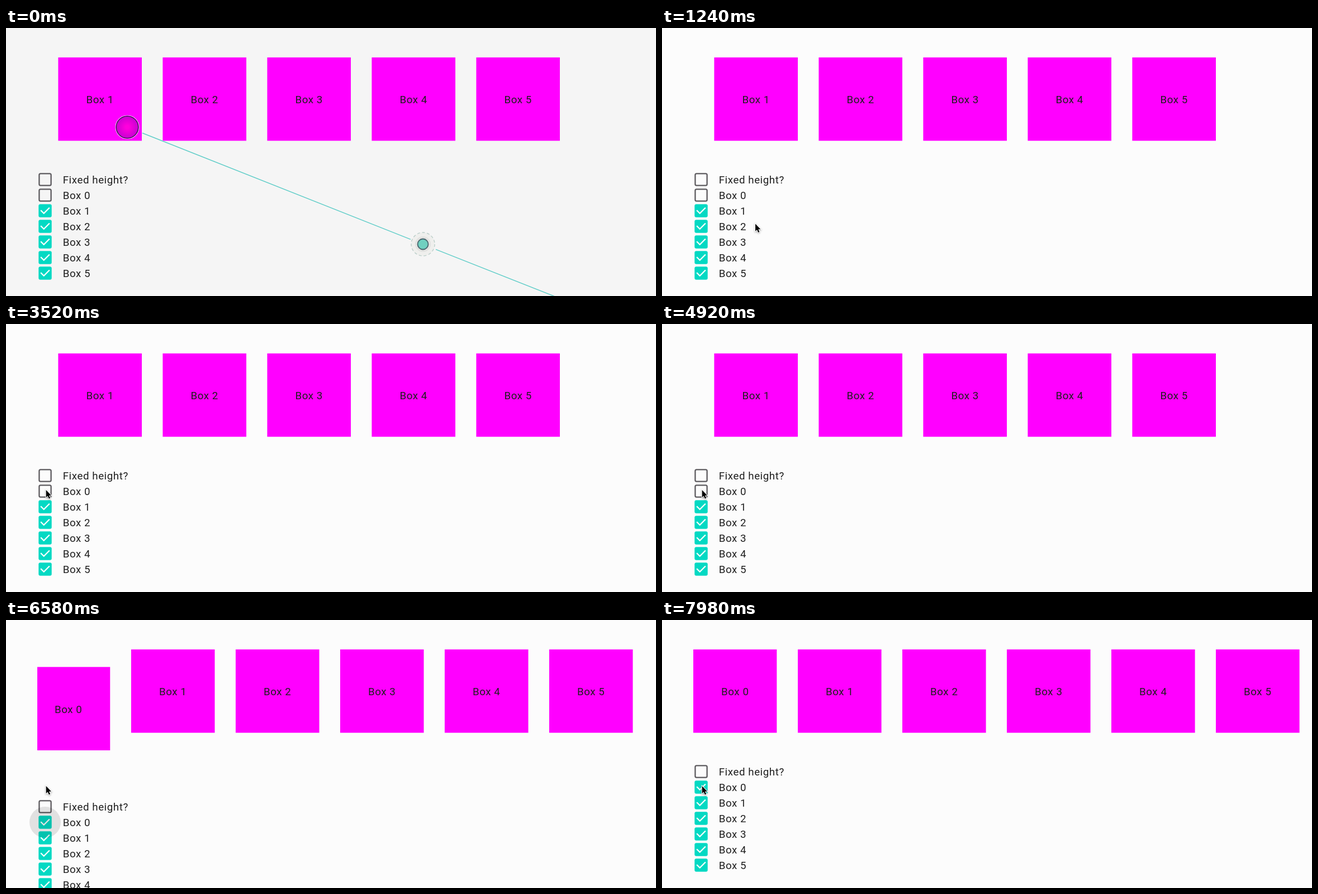
An HTML page with a canvas for the animation above (8 s loop, 1163x481 px).

```html
<!DOCTYPE html>
<html lang="en">
<head>
<meta charset="utf-8">
<style>
html, body { margin: 0; width: 100%; height: 100%; overflow: hidden; background: #fcfcfc; }
canvas { display: block; }
</style>
</head>
<body>
<canvas id="stage" width="1163" height="481"></canvas>
<script>
const ctx = document.getElementById('stage').getContext('2d');
const LOOP = 8000, SIDE = 149.6, GAP = 37.4, LEFT = 56, TOP = 52.8;
const TOGGLE = 6260;

const clamp = x => Math.min(1, Math.max(0, x));
const progress = (t, from, to) => clamp((t - from) / (to - from));
const smooth = x => x * x * (3 - 2 * x);
const mix = (a, b, p) => a + (b - a) * p;

// Piecewise linear track of [time, value] keys, optionally eased
function track(t, keys, ease = x => x) {
  let value = keys[0][1];
  for (let i = 1; i < keys.length; i++) {
    value = mix(value, keys[i][1], ease(progress(t, keys[i - 1][0], keys[i][0])));
  }
  return value;
}

// Critically damped spring
function boxWidth(t) {
  const u = track(t, [[6340, 0], [6580, 3.5], [6600, 5.1], [6700, 5.1], [6720, 6], [7000, 12]]);
  return t < 6340 ? 0 : SIDE * (1 - (1 + u) * Math.exp(-u));
}

function circle(x, y, r, fill, stroke, width = 1) {
  ctx.beginPath();
  ctx.arc(x, y, r, 0, 7);
  if (fill) { ctx.fillStyle = fill; ctx.fill(); }
  if (stroke) { ctx.strokeStyle = stroke; ctx.lineWidth = width; ctx.stroke(); }
}

function line(color, width, ...points) {
  ctx.beginPath();
  points.forEach(p => ctx.lineTo(...p));
  ctx.strokeStyle = color;
  ctx.lineWidth = width;
  ctx.stroke();
}

function label(text, x, y) {
  ctx.fillStyle = '#1f1f1f';
  ctx.fillText(text, x, y + 6.6);
}

function box(i, x, y) {
  ctx.fillStyle = '#f0f';
  ctx.fillRect(x, y, SIDE, SIDE);
  ctx.textAlign = 'center';
  label('Box ' + i, x + SIDE / 2, y + 76);
}

function checkbox(y, checked) {
  ctx.beginPath();
  if (checked) {
    ctx.roundRect(58.3, y - 11.7, 23.4, 23.4, 3);
    ctx.fillStyle = '#03d9c3';
    ctx.fill();
    ctx.lineCap = 'square';
    line('#fff', 2.3, [63, y], [67.7, y + 4.7], [77, y - 4.7]);
    ctx.lineCap = 'butt';
  } else {
    ctx.roundRect(59.4, y - 10.6, 21.2, 21.2, 2.4);
    ctx.strokeStyle = '#5c5a5e';
    ctx.lineWidth = 2.3;
    ctx.stroke();
  }
}

function options(t, offset) {
  const names = ['Fixed height?', ...Array.from({ length: 6 }, (_, i) => 'Box ' + i)];
  ctx.textAlign = 'left';
  names.forEach((name, i) => {
    const y = 272 + 28 * i + offset;
    checkbox(y, i > 1 || (i === 1 && t >= TOGGLE));
    label(name, 101.7, y);
  });
  const alpha = 0.105 * progress(t, 5680, 5750) * (1 - progress(t, 6690, 6850));
  if (alpha) circle(70, 300 + offset, mix(9, 28, progress(t, 5680, 5880)), `rgba(0,0,0,${alpha})`);
}

function cursor(t) {
  const x = track(t, [[300, 217], [1200, 167], [1680, 167], [2300, 71.7]], smooth);
  const y = track(t, [[300, 200], [1200, 351.5], [1680, 351.5], [2300, 307], [2520, 307], [2900, 298]], smooth);
  ctx.save();
  ctx.globalAlpha = progress(t, 200, 400);
  ctx.translate(x, y);
  const arrow = new Path2D('M0 0V13.2L3 10.5 5.1 15.4 7.4 14.4 5.3 9.7H9.4Z');
  ctx.shadowColor = 'rgba(0,0,0,.35)';
  ctx.shadowBlur = 3;
  ctx.shadowOffsetY = 1;
  ctx.strokeStyle = '#fff';
  ctx.lineWidth = 2;
  ctx.stroke(arrow);
  ctx.shadowColor = 'transparent';
  ctx.fillStyle = '#000';
  ctx.fill(arrow);
  ctx.restore();
}

function connector(alpha) {
  ctx.save();
  ctx.globalAlpha = alpha;
  line('#5fcdc8', 1.4, [244, 188.5], [724, 379.3]);
  line('#5fcdc8', 1.4, [769, 397.3], [981, 481.5]);

  const glow = ctx.createRadialGradient(217, 178, 3, 217, 178, 20);
  glow.addColorStop(0, '#f0d');
  glow.addColorStop(1, '#c800d2');
  circle(217, 178, 21, glow, '#f4c6f4', 1.2);
  circle(217, 178, 19.8, null, '#4a1060', 1.6);

  circle(746, 388, 21, 'rgba(235,235,232,.6)');
  ctx.setLineDash([5, 3.8]);
  circle(746, 388, 21, null, '#bccfca', 1.4);
  ctx.setLineDash([]);
  circle(746, 388, 14, 'rgba(190,190,190,.25)');
  circle(746, 388, 9.5, '#70d0c0', '#49656e', 1.8);
  ctx.restore();
}

function draw(t) {
  const overlay = 1 - smooth(progress(t, 20, 420));
  const shade = Math.round(mix(252, 245, overlay));
  ctx.fillStyle = `rgb(${shade},${shade},${shade})`;
  ctx.fillRect(0, 0, 1163, 481);
  ctx.font = '18.7px Roboto, sans-serif';
  ctx.letterSpacing = '0.584px';

  const width = boxWidth(t);
  const offset = t < TOGGLE ? 0 : 3.3 * (SIDE - width);
  if (width > 0) {
    ctx.save();
    ctx.beginPath();
    ctx.rect(LEFT, 0, width, 481);
    ctx.clip();
    box(0, LEFT + width - SIDE, TOP + offset / 2);
    ctx.restore();
  }
  for (let i = 1; i < 6; i++) box(i, LEFT + width + GAP + (i - 1) * (SIDE + GAP), TOP);
  options(t, offset);
  if (overlay) connector(overlay);
  cursor(t);
}

const start = performance.now();
function tick() {
  draw((performance.now() - start) % LOOP);
  requestAnimationFrame(tick);
}
tick();
</script>
</body>
</html>
```
